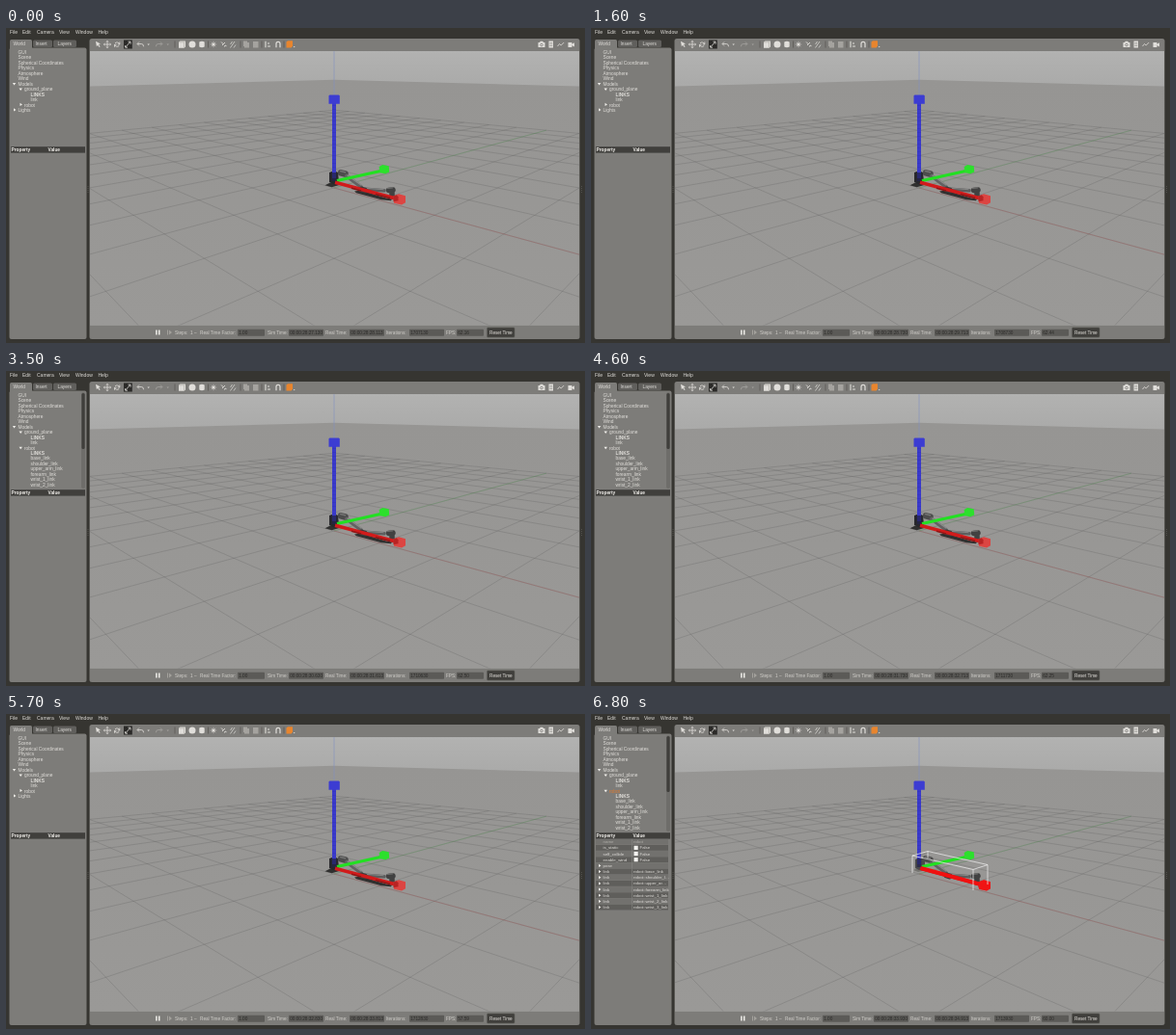
Recreate the animation shown at these times as an HTML page. Size 600 by 327 pixels, loop 6.9 s.

```html
<!DOCTYPE html>
<html lang="en">
<head>
<meta charset="utf-8">
<title>Robot simulator</title>
<style>
  html, body { margin: 0; width: 100%; height: 100%; overflow: hidden; background: #363531; }
  svg { display: block; width: 600px; height: 327px; }
  text { font: 4.8px "Liberation Sans", Arial, sans-serif; fill: #e0deda; white-space: pre; }
  .menu text { font-size: 5px; }
  .bold { font-weight: bold; }
  .head { fill: #f2f0ec; font-weight: bold; }
  .status text { font-size: 4.7px; fill: #d2d0cb; }
  .status .value { fill: #2b2a28; }
  .props text { font-size: 4.4px; }
  .props .dim { fill: #b0aea9; }
  .icon { fill: none; stroke: #e0deda; stroke-width: .8; }
  .solid { fill: #e0deda; stroke: none; }
  .off { opacity: .4; }

  /* hard state changes of the tree and the selection */
  .open, .closed, .picked, .free, .hot { animation: 6.9s step-end infinite; }
  .open { animation-name: open; }
  .closed { animation-name: closed; }
  .picked { animation-name: picked; }
  .free { animation-name: free; }
  .hot { animation-name: hot; }
  @keyframes open { 0%, 69.57% { opacity: 0 } 27.54%, 91.3%, 100% { opacity: 1 } }
  @keyframes closed { 0%, 69.57% { opacity: 1 } 27.54%, 91.3%, 100% { opacity: 0 } }
  @keyframes picked { 0%, 46.38% { opacity: 0 } 27.54%, 91.3%, 100% { opacity: 1 } }
  @keyframes free { 0%, 46.38% { opacity: 1 } 27.54%, 91.3%, 100% { opacity: 0 } }
  @keyframes hot { 0% { opacity: 0 } 91.3%, 100% { opacity: 1 } }
</style>
</head>
<body>
<svg viewBox="0 0 600 327">
  <defs>
    <clipPath id="view"><rect x="87" y="24" width="507" height="284.5"/></clipPath>
    <linearGradient id="sky" gradientUnits="userSpaceOnUse" x1="0" y1="24" x2="0" y2="60">
      <stop offset="0" stop-color="#b2b2b1"/><stop offset="1" stop-color="#aaaaa9"/>
    </linearGradient>
    <linearGradient id="floor" gradientUnits="userSpaceOnUse" x1="0" y1="54" x2="0" y2="308">
      <stop offset="0" stop-color="#969593"/><stop offset="1" stop-color="#9a9997"/>
    </linearGradient>
  </defs>

  <rect width="600" height="327" fill="#363531"/>
  <g class="menu" id="menu"></g>

  <!-- side panel -->
  <rect x="4" y="12" width="23" height="11" rx="1.5" fill="#7d7c79"/>
  <rect x="28" y="12.5" width="20" height="7.5" rx="1.5" fill="#605f5c"/>
  <rect x="49" y="12.5" width="24" height="7.5" rx="1.5" fill="#605f5c"/>
  <text x="7.5" y="18">World</text><text x="30.5" y="18">Insert</text><text x="53.5" y="18">Layers</text>
  <rect x="3.5" y="20.5" width="80" height="302.5" rx="2" fill="#7d7c79"/>
  <g id="tree"></g>
  <g class="closed" id="shut"></g>
  <g class="open" id="links">
    <rect x="78" y="22" width="4" height="100" rx="2" fill="#6e6d6a"/>
    <rect x="78.4" y="23" width="3.2" height="58" rx="1.6" fill="#3f3e3b"/>
  </g>
  <text class="picked" x="19" y="81.5" style="fill:#e27a2c">robot</text>
  <g class="free"><text class="open" x="19" y="81.5">robot</text></g>
  <rect x="5" y="123.200" width="77" height="6.400" fill="#403f3c"/>
  <text class="head" x="5.5" y="128.200">Property</text><text class="head" x="43.5" y="128.200">Value</text>
  <g class="props picked" id="props"></g>

  <!-- toolbar, view and status bar share one frame -->
  <rect x="86.500" y="11" width="508" height="312" rx="2.500" fill="#7d7c79"/>
  <g class="icon">
    <path class="solid" d="M93 13.800l5 2.700-2 .6 1.600 2.100-.9.700-1.600-2.100-1.200 1.400z"/>
    <path d="M105 13.500v7M101.500 17h7M104 14.500l1-1.200 1 1.200M104 19.500l1 1.200 1-1.200M102.500 16l-1.200 1 1.200 1M107.500 16l1.200 1-1.200 1"/>
    <path d="M113 15.800a2.800 2.800 0 0 1 4.700 1.200M117.200 18.500a2.800 2.800 0 0 1-4.700-1.200M117.800 14.500v2.500h-2M112.500 19.800v-2.500h2"/>
    <rect x="122" y="12.500" width="8.800" height="9" fill="#2b2a28" stroke="none"/>
    <path d="M123.800 20l5-5.800M126.500 14.200h2.500v2.500M123.600 18v2.200h2.400"/>
    <path d="M136.300 16.500h4q2.300 0 2.300 2.800M138 14.500l-2 2 2 2"/>
    <path class="solid" d="M146.500 16.500h2.400l-1.200 1.500z"/>
    <g class="off"><path d="M161.700 16.500h-4q-2.300 0-2.300 2.800M160 14.500l2 2-2 2"/>
      <path class="solid" d="M166.500 16.500h2.400l-1.200 1.500z"/></g>
    <path class="solid" d="M179 14.500l1.500-1h5.500v6l-1.500 1.200H179z"/>
    <path d="M179 14.800h5.500v5.500M184.500 14.800l1.300-1" stroke="#a09e99" stroke-width=".5"/>
    <circle class="solid" cx="193" cy="17" r="3.500"/>
    <path class="solid" d="M200.300 14.500q2.700-1.600 5.400 0v5q-2.700 1.600-5.400 0z"/>
    <circle class="solid" cx="215" cy="17" r="1.500"/>
    <path d="M215 13.700v6.600M211.700 17h6.600M212.700 14.700l4.600 4.600M217.300 14.700l-4.600 4.600" stroke-width=".5"/>
    <path d="M223 14.500l2.500 2.500M224 18l3-3M226.500 19.500l.5-1.500 1.500.7" stroke-width=".9"/>
    <path d="M232.500 17l2-3M232.500 20.500l4.500-6.500M236 20.500l2-3" stroke-width=".7"/>
    <path class="solid off" d="M246 13.500h4v1.500h2v5.500h-5v-1.500h-1zM256 14h5.500v6.500H256z"/>
    <path d="M269 13.800v6.500M271 16h2M271 19h3" stroke-width="1.100"/>
    <path d="M280 20.300v-4a2 2 0 0 1 4 0v4" stroke-width="1.200"/>
    <path class="solid" d="M290.500 14.500l1.500-1.200h5v5.500l-1.500 1.700h-5z" style="fill:#e8852e"/>
    <path class="solid" d="M297.800 19h1.800l-.9 1.200z"/>
    <path d="M175 13.500v7M209.500 13.500v7M243 13.500v7M265 13.500v7M288 13.500v7" stroke="#565551" stroke-width=".7"/>
    <path class="solid" d="M551.500 15h1.500l.8-1.200h2.400l.8 1.200h1.500v5h-7z"/>
    <circle cx="555" cy="17.500" r="1.300" stroke="#7d7c79"/>
    <path class="solid" d="M562.500 13.500h4.500v7h-4.500z"/>
    <path d="M563.300 15.500h3M563.300 17h3M563.300 18.500h3" stroke="#7d7c79" stroke-width=".5"/>
    <path d="M571.500 19l2-2.500 1.700 1.500 3-3"/>
    <path class="solid" d="M582.500 15h4v1.700l2.500-1.500v4.300l-2.500-1.500V20h-4z"/>
  </g>

  <!-- 3D view -->
  <g clip-path="url(#view)">
    <rect x="87" y="24" width="507" height="285" fill="url(#sky)"/>
    <path id="ground" fill="url(#floor)"/>
    <path id="grid" fill="none" stroke="#4d4d4b" stroke-width=".45" opacity=".48"/>
    <path id="xline" stroke="#b54a4a" stroke-width=".5" opacity=".5"/>
    <path id="yline" stroke="#4aae4a" stroke-width=".5" opacity=".42"/>
    <path d="M340 24V72" stroke="#8292c4" stroke-width=".6"/>

    <g class="free">
      <path d="M330.500 163.200l5-2.500 8-.2 2 2.500-8 2.300zM361 169.500l7-1 26 8 6 1-1 1.700-10-1-26-7z" fill="#30302f"/>
      <path d="M335 150l5-2 4 2 1 10-5 2.500-5-2.500z" fill="#28282c"/>
    </g>
    <g class="picked">
      <path d="M334 162l7-3 6 3-8 2z" fill="#74736f"/>
      <path d="M336 151l5-2 5 2v9l-6 2-4-2z" fill="#4a4a4b"/>
    </g>
    <g stroke-linecap="round" fill="none">
      <path d="M347 150.300l4.500 1.200" stroke="#4c4c4c" stroke-width="6.500"/>
      <path d="M346.500 148.500l5 1.200" stroke="#747473" stroke-width="1.500"/>
      <path d="M353 153.500l15 11.500" stroke="#626262" stroke-width="4"/>
      <path d="M354 153l14 10" stroke="#8b8b8a" stroke-width="1.300"/>
      <path d="M372 167.300l20 1.500" stroke="#5d5d5d" stroke-width="3.400"/>
      <path d="M374 166.400l17 1.300" stroke="#878786" stroke-width="1"/>
      <path d="M368.500 167.500l3 1" stroke="#3a3a3a" stroke-width="6"/>
      <path d="M396.500 168.500l4.500-.5M400 170v5" stroke="#414141" stroke-width="5.500"/>
      <path d="M395.500 166.500l5-.7" stroke="#6f6f6e" stroke-width="1.200"/>
    </g>

    <path d="M340 78V156" stroke="#3a3acb" stroke-width="4"/>
    <path d="M340 80V154" stroke="#2a2aa6" stroke-width="4" stroke-dasharray=".6 3.400" opacity=".5"/>
    <path d="M337.800 150h4.500v9h-4.500z" fill="#23234c" opacity=".75"/>
    <path d="M334.500 70.300l1-.8h9.300l1 .8v8.400h-11.300z" fill="#3c3cd2"/>
    <path d="M343 158.500L388 148.500" stroke="#22e022" stroke-width="3.200"/>
    <path d="M386.700 144l3.500-2 6.500 1.200.5 6.300-4 1.700-6-1z" fill="#2ce02c"/>
    <path d="M341 160.300L404 177" stroke="#d11b1b" stroke-width="3.500"/>
    <path class="free" d="M358 166.300L368 169M383 172.500L398 176.500" stroke="#8f1616" stroke-width="1.500"/>
    <path d="M401.500 174.500l5.500-2.200 7 2v7l-4 2.200-8-1.800z" fill="#dc4542"/>
    <path d="M401.500 174.500l3-1.200 2 2v4l-5 1z" fill="#b82424"/>
    <g class="hot">
      <path d="M342 160L404 177" stroke="#f01010" stroke-width="4"/>
      <path d="M401.500 174.500l5.500-2.200 7 2v7l-4 2.200-8-1.800z" fill="#f01414"/>
    </g>
    <path class="picked" d="M333 165V147L349 142.500 411 156.500 396 161.500 333 147M349 142.500v7M411 156.500V177M396 161.500V183" fill="none" stroke="#f2f2f2" stroke-width=".7"/>
  </g>
  <path d="M85 164v8M596.500 164v8" stroke="#6b6a65" stroke-width=".7" stroke-dasharray=".8 1.200"/>

  <!-- status bar -->
  <path d="M155.200 313.500h1.500v5h-1.500zM158 313.500h1.500v5H158z" fill="#f0eeea"/>
  <path d="M167 313.500h1v5h-1zM169 313.500l3 2.500-3 2.500z" fill="#a3a19c"/>
  <g class="status" id="status">
    <text x="175" y="317.800">Steps:</text><text x="191" y="317.800">1 –</text>
    <rect x="498.500" y="311" width="28.500" height="10" rx="1" fill="#403f3c" stroke="#5c5b57" stroke-width=".6"/>
    <text x="501" y="317.800" style="fill:#e4e2dd">Reset Time</text>
  </g>
</svg>
<script>
const LOOP = 6900;
const $ = id => document.getElementById(id);
const add = (id, html) => $(id).insertAdjacentHTML("beforeend", html);
const label = (x, y, s, cls = "") => `<text x="${x}" y="${y}" class="${cls}">${s}</text>`;
const arrow = (x, y, down) =>
  `<path fill="#f0eeea" d="M${x} ${y}${down ? "h3.4l-1.700 2.400z" : "v3.200l2.400-1.600z"}"/>`;
const rowY = i => 27 + i * 5.45;

[["File", 4], ["Edit", 17], ["Camera", 32], ["View", 55], ["Window", 72], ["Help", 95.5]]
  .forEach(([s, x]) => add("menu", label(x, 6, s)));

// model tree
["GUI", "Scene", "Spherical Coordinates", "Physics", "Atmosphere", "Wind", "Models"]
  .forEach((s, i) => add("tree", label(12.5, rowY(i), s)));
add("tree", label(19, rowY(7), "ground_plane") + label(25.5, rowY(8), "LINKS", "bold") +
  label(25.5, rowY(9), "link") + arrow(6.8, 57, true) + arrow(13.5, 62.5, true));
add("shut", label(19, 81.5, "robot") + arrow(14.5, 77.8) +
  label(12.5, rowY(11), "Lights") + arrow(8, 83.3));
add("links", arrow(13.5, 78.8, true));
["LINKS", "base_link", "shoulder_link", "upper_arm_link", "forearm_link", "wrist_1_link", "wrist_2_link"]
  .forEach((s, i) => add("links", label(25.5, rowY(11 + i), s, i ? "" : "bold")));

// property rows
const parts = ["base_link", "shoulder_l…", "upper_ar…", "forearm_link", "wrist_1_link", "wrist_2_link", "wrist_3_link"];
const rows = [["name", "robot"], ["is_static", "False"], ["self_collide", "False"], ["enable_wind", "False"],
  ["pose", ""], ...parts.map(p => ["link", "robot::" + p])];
rows.forEach(([key, value], i) => {
  const y = 129.8 + i * 6.17, check = value === "False", cls = i ? "" : "dim";
  add("props", `<rect x="5" y="${y}" width="75" height="5.8" fill="${i % 2 ? "#5f5e5b" : "#72716e"}"/>` +
    `<path d="M42.5 ${y}v5.8" stroke="#8d8c88" stroke-width=".5"/>` +
    (i > 3 ? arrow(8, y + 1.3) : "") +
    (check ? `<rect x="44.5" y="${y + .8}" width="4.2" height="4.2" fill="#f4f3f0"/>` : "") +
    label(12.5, y + 4.4, key, cls) + label(check ? 50.5 : 44, y + 4.4, value, cls));
});

// perspective camera at (5, -5, 2) looking at the world origin
const R = Math.SQRT1_2, pitch = Math.atan2(2, 10 * R), C = Math.cos(pitch), S = Math.sin(pitch);
const depth = ([x, y]) => (10 * R - (x - y) * R) * C + 2 * S;
function project([x, y]) {
  const ahead = 10 * R - (x - y) * R, k = 440 / depth([x, y]);
  return (340 + (x + y) * R * k).toFixed(2) + " " + (166 + (2 * C - ahead * S) * k).toFixed(2);
}
function segment(a, b) {
  const near = .3, da = depth(a), db = depth(b);
  if (da < near && db < near) return "";
  const cut = (p, q, dp, dq) => p.map((v, i) => v + (q[i] - v) * (near - dp) / (dq - dp));
  if (da < near) a = cut(a, b, da, db);
  else if (db < near) b = cut(b, a, db, da);
  return `M${project(a)}L${project(b)}`;
}
let lines = "";
for (let i = -10; i <= 10; i++) lines += segment([i, -10], [i, 10]) + segment([-10, i], [10, i]);
$("grid").setAttribute("d", lines);
$("xline").setAttribute("d", segment([0, 0], [10, 0]));
$("yline").setAttribute("d", segment([0, 0], [0, 10]));
$("ground").setAttribute("d", `M${project([-50, 0])}L${project([-50, 50])}L${project([0, 50])}V309H0Z`);

// status fields
[["Real Time Factor:", 201, 240, 28, "rtf"], ["Sim Time:", 271, 293, 36, "sim"], ["Real Time:", 331, 356, 36, "real"],
  ["Iterations:", 394, 418, 36, "iter"], ["FPS:", 456, 467, 28, "fps"]]
  .forEach(([s, x, box, w, id]) => add("status", label(x, 317.8, s) +
    `<rect x="${box}" y="312.7" width="${w}" height="7" rx=".8" fill="#5b5a57"/>` +
    `<text id="${id}" class="value" x="${box + 1.2}" y="317.8"></text>`));
$("rtf").textContent = "1.00";

const rates = [[0, "62.16"], [1600, "62.44"], [2900, "61.57"], [3500, "62.50"], [4600, "62.25"], [5700, "57.59"], [6800, "60.00"]];
const clock = ms => "00:00:28:" + (ms / 1000).toFixed(3);
let start;
function tick(now) {
  start ??= now;
  const t = Math.floor((now - start) % LOOP / 100) * 100;
  $("sim").textContent = clock(27130 + t);
  $("real").textContent = clock(28113 + t);
  $("iter").textContent = 1707130 + t;
  $("fps").textContent = rates.filter(r => r[0] <= t).pop()[1];
  requestAnimationFrame(tick);
}
requestAnimationFrame(tick);
</script>
</body>
</html>
```
